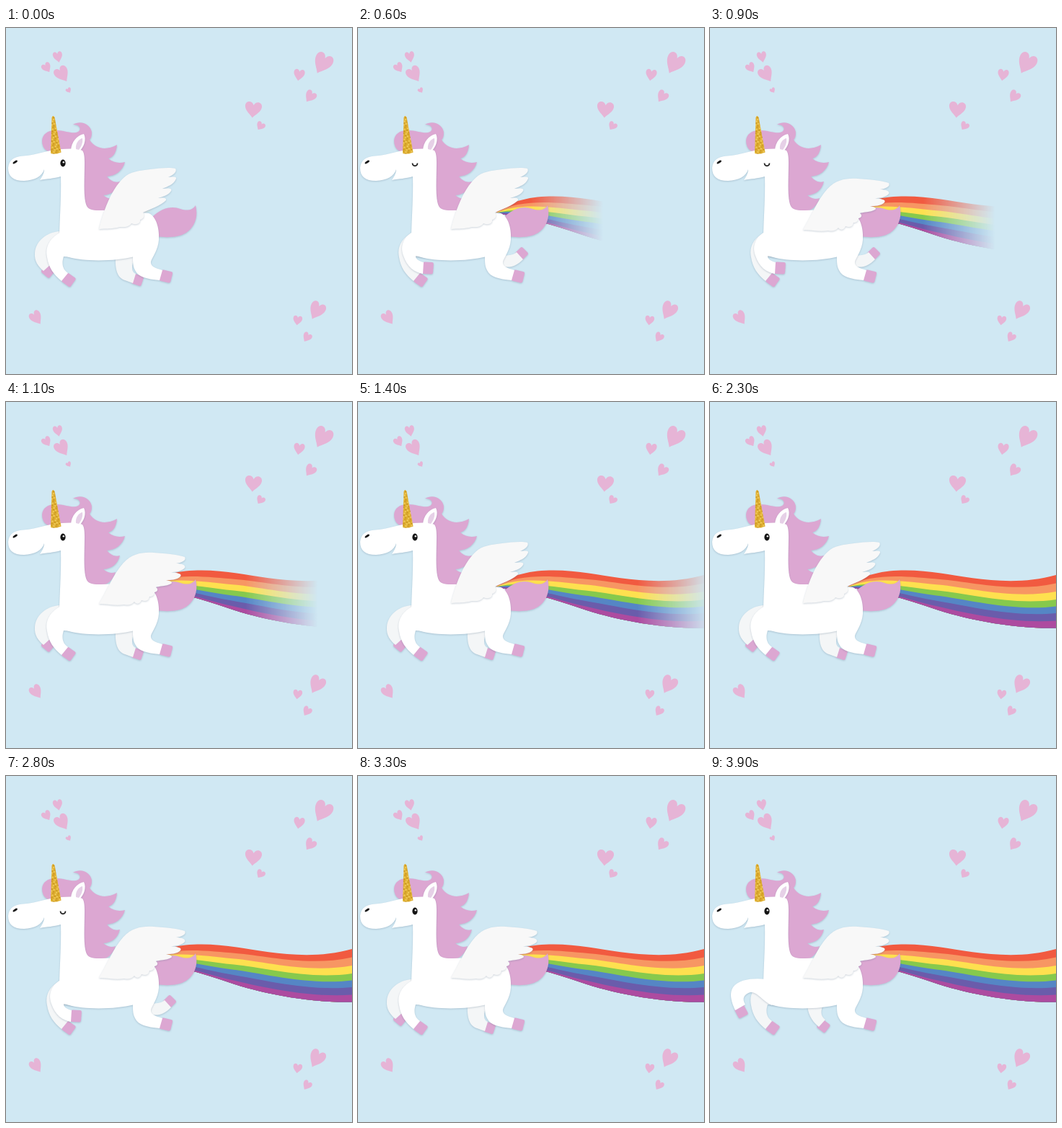
An HTML page without scripts that plays this animation: 480x480 px, repeating every 4000 ms.

```html
<!DOCTYPE html>
<html lang="en">
<head>
<meta charset="utf-8">
<title>Flying unicorn</title>
<style>
  html, body { margin: 0; width: 100%; height: 100%; overflow: hidden; background: #d0e8f3; }
  svg { display: block; width: 100vw; height: 100vh; }
  .hearts { fill: #e6b4d6; }
  .pink { fill: #dca7d2; }
  .white { fill: #fff; }
  .far { fill: #f4f6f7; }
  .wing { fill: #f8f8f8; }
  .lift { filter: drop-shadow(0 1px 1px rgba(80, 105, 130, .28)); }

  /* Legs: gather, tuck, gather, stretch; half a second each. */
  .gather { animation: gather 1s step-end infinite; }
  .tuck { animation: tuck 2s step-end infinite; }
  .stretch { animation: stretch 2s step-end infinite; }
  .awake { animation: awake 2s step-end infinite; }
  .up { animation: gather calc(4s / 7) step-end infinite; }
  .down { animation: lower calc(4s / 7) step-end infinite; }
  .reveal { animation: reveal 4s infinite; }

  @keyframes gather { 0% { opacity: 1 } 50%, 100% { opacity: 0 } }
  @keyframes lower { 0% { opacity: 0 } 50%, 100% { opacity: 1 } }
  @keyframes tuck { 0% { opacity: 0 } 25% { opacity: 1 } 50%, 100% { opacity: 0 } }
  @keyframes stretch { 0% { opacity: 0 } 75%, 100% { opacity: 1 } }
  @keyframes awake { 0% { opacity: 1 } 25% { opacity: 0 } 50%, 100% { opacity: 1 } }
  @keyframes reveal {
    0% { transform: translateX(205px); animation-timing-function: steps(6) }
    15% { transform: translateX(340px); animation-timing-function: steps(16) }
    55%, 100% { transform: translateX(636px) }
  }
</style>
</head>
<body>
<svg viewBox="0 0 480 480">
  <defs>
    <path id="heart" d="M0 10C-3 6-10 2-10-4C-10-10-2-11 0-5C2-11 10-10 10-4C10 2 3 6 0 10Z"/>
    <rect id="hoof" class="pink" x="-7.5" y="-7.5" width="15" height="15" rx="2.5"/>
    <g id="front-leg">
      <use href="#hoof" transform="translate(87 349.5) rotate(36)"/>
      <path d="M76 283C60 292 54 304 57 318C59 332 66 342 77 351L86 340C78 335 77 326 80 317L95 318Z"/>
    </g>
    <linearGradient id="fade">
      <stop offset=".857" stop-color="#fff"/>
      <stop offset="1" stop-color="#fff" stop-opacity="0"/>
    </linearGradient>
    <mask id="trail" maskUnits="userSpaceOnUse" x="0" y="0" width="480" height="480">
      <rect class="reveal" x="-700" width="700" height="480" fill="url(#fade)"/>
    </mask>
    <clipPath id="bow">
      <path d="M190 257C230 262 270 272.5 310 286.500S420 315 480 313.500V200H190Z"/>
    </clipPath>
    <pattern id="glitter" width="7" height="8" patternUnits="userSpaceOnUse" patternTransform="rotate(17)">
      <path fill="#dfae30" d="M0 0H7V8H0Z"/>
      <path stroke="#fae07a" stroke-width="1.4" d="M1 1h1.5M4 3.5h1.6M1.5 6h1.5"/>
      <path stroke="#b07f18" stroke-width="1.2" d="M4.5 1h1.4M1 3.6h1.3M4.5 6.5h1.5"/>
    </pattern>
  </defs>

  <rect width="480" height="480" fill="#d0e8f3"/>

  <g class="hearts">
    <use href="#heart" transform="translate(72 40) rotate(-12) scale(.65 .8)"/>
    <use href="#heart" transform="translate(56.5 55) rotate(-32) scale(.64 .72)"/>
    <use href="#heart" transform="translate(78 64) rotate(-32) scale(.98 1.18)"/>
    <use href="#heart" transform="translate(87 86.500) rotate(-32) scale(.38)"/>
    <use href="#heart" transform="translate(439 49) rotate(28) scale(1.28 1.55)"/>
    <use href="#heart" transform="translate(406.5 65) rotate(10) scale(.76 .85)"/>
    <use href="#heart" transform="translate(422 95) rotate(35) scale(.77 .88)"/>
    <use href="#heart" transform="translate(343 113) rotate(6) scale(1.16)"/>
    <use href="#heart" transform="translate(353 136) rotate(33) scale(.61)"/>
    <use href="#heart" transform="translate(42 402) rotate(-34) scale(.82 1.04)"/>
    <use href="#heart" transform="translate(431 392) rotate(28) scale(1.08 1.34)"/>
    <use href="#heart" transform="translate(404.5 405.5) rotate(8) scale(.63 .69)"/>
    <use href="#heart" transform="translate(417.5 429) rotate(32) scale(.62 .7)"/>
  </g>

  <!-- Each band runs down under the next one. -->
  <g mask="url(#trail)">
    <g clip-path="url(#bow)">
      <path fill="#f15a40" d="M190 257C225 228 280 232 320 237.500S420 257 480 240V320H190Z"/>
      <path fill="#f79663" d="M190 257C226 235 279 243 319 246S420 265 480 251.500V320H190Z"/>
      <path fill="#fee04f" d="M190 257C226 240 277 250 317 253.500S420 274 480 263V320H190Z"/>
      <path fill="#86c94d" d="M190 257C227 246 276 258 316 261.500S420 283 480 274V320H190Z"/>
      <path fill="#5586c5" d="M190 257C228 250 274 264 314 268.500S420 291 480 283.500V320H190Z"/>
      <path fill="#6a5cab" d="M190 257C229 254 273 269 313 275.500S420 299 480 293V320H190Z"/>
      <path fill="#ad4ba0" d="M190 257C229 258 271 273 311 282.500S420 308 480 303.500V320H190Z"/>
    </g>
  </g>

  <path class="pink lift" d="M203 262C215 250 230 246 242 251C251 254 259 253 263 246C267 262 262 276 250 284C239 291 222 291 209 289Z"/>

  <g class="far lift">
    <g class="gather">
      <use href="#hoof" transform="translate(58.5 337) rotate(40)"/>
      <path d="M75 282C56 283 41 296 40 312C39 324 45 331 52 337L62 328C57 322 64 310 78 306Z"/>
      <use href="#hoof" transform="translate(182.5 349.5) rotate(18) scale(.95)"/>
      <path d="M152 315C151 335 154 346 165 350L176 354L180 341C173 338 174 330 179 316Z"/>
    </g>
    <g class="tuck">
      <use href="#front-leg"/>
      <use href="#hoof" transform="translate(227 313) rotate(-45) scale(.93)"/>
      <path d="M195 315L202 331C212 333 220 330 229 321L220 311C214 316 205 316 195 315Z"/>
    </g>
    <g class="stretch">
      <use href="#front-leg"/>
      <use href="#hoof" transform="translate(157.5 347) rotate(37) scale(.95)"/>
      <path d="M135 315C135 328 140 339 151 348L160 338C153 333 153 326 158 315Z"/>
    </g>
  </g>

  <path class="pink lift" d="M66 173C55 172 50 166 50 156C51 147 58 142 68 142C80 141 92 148 100 144C106 140 101 133 93 134C104 127 118 134 119 145C119 150 118 153 116 155C123 167 138 171 154 162C153 173 149 179 142 181C149 187 157 188 165 186C162 198 152 205 140 206C146 213 152 215 158 213C155 225 147 231 135 232C141 237 147 238 152 236C148 248 140 254 130 255H108L98 170Z"/>

  <g class="white lift">
    <use href="#hoof" transform="translate(222 344.5) rotate(14) scale(1.06)"/>
    <path d="M3 194C4 183 11 178.500 24 177.500C45 176 58 169 76 168C88 167 98 167 105 169.500C108 171 109 177 109 186C109 212 107 236 112 247C115 253 123 253 132 253C155 251 185 255 198 257C210 262 213 282 212 294C211 308 203 318 201 324C200 330 206 333 217 336L213 350C195 348 184 346 179 336C176 330 176 325 176 317.500C155 323 110 325 86 317.500C76 314 73 306 74 294C74 270 77 235 76 206C66 209 57 209 47 211C50 206 53 202 53 196C50 206 40 211 25 212C10 212 3 206 3 194Z"/>
    <use class="gather" href="#front-leg"/>
    <g class="tuck">
      <use href="#hoof" transform="translate(97 333) rotate(4) scale(1 1.1)"/>
      <path d="M76 283C63 290 58 303 63 316C68 331 78 339 90 341L91 325C83 323 80 320 80 316L95 318Z"/>
    </g>
    <g class="stretch">
      <use href="#hoof" transform="translate(43.5 327) rotate(62) scale(.98)"/>
      <path d="M78 282C60 280 40 282 32 293C26 302 30 315 35 325L49 317C44 309 47 303 56 300C66 299 72 312 86 318Z"/>
    </g>
    <path d="M90 169C91 158 98 149 108 147C112 155 108 165 102 171Z"/>
  </g>
  <path fill="#e6d0e7" d="M97 168C96 160 101 154 106 153C107 160 104 165 101 169Z"/>
  <path fill="url(#glitter)" d="M63.500 124Q65.500 120 67.500 124L76.500 172.500Q69 176 62 174Z"/>

  <g class="awake">
    <ellipse cx="79" cy="187.5" rx="3.6" ry="5" fill="#151515"/>
    <circle cx="79.8" cy="186.3" r="1.2" fill="#fff"/>
  </g>
  <path class="tuck" d="M75.5 187.5C76 192.5 82 192.5 82.500 187.500" fill="none" stroke="#222" stroke-width="1.8"/>
  <ellipse cx="12.7" cy="186" rx="3.6" ry="1.5" fill="#151515" transform="rotate(-32 12.7 186)"/>

  <g class="wing lift">
    <path class="up" d="M129 279C135 255 145 225 163 208C172 199 185 198 200 196C215 194 228 193 235 195C238 199 232 204 225 207C232 206 237 206 236 209C233 217 224 220 217 223C225 222 231 222 229 226C226 232 217 234 211 236C217 235 223 235 222 239C216 246 198 252 190 256C193 260 191 265 186 266C187 271 181 274 174 271C170 277 163 276 158 276C148 279 139 278 129 279Z"/>
    <path class="down" d="M129 280C140 262 148 240 163 223C175 210 190 208 205 209C222 210 240 212 248 215C251 220 243 223 236 224C243 224 250 226 248 230C244 235 235 236 229 236C237 237 245 238 242 242C237 247 228 247 222 247C228 248 232 250 229 252C222 256 213 255 208 257C212 260 210 263 206 264C206 268 203 270 199 270C198 276 194 277 188 275C185 281 181 281 178 277C174 282 169 282 164 281C152 283 140 280 129 280Z"/>
  </g>
</svg>
</body>
</html>
```
